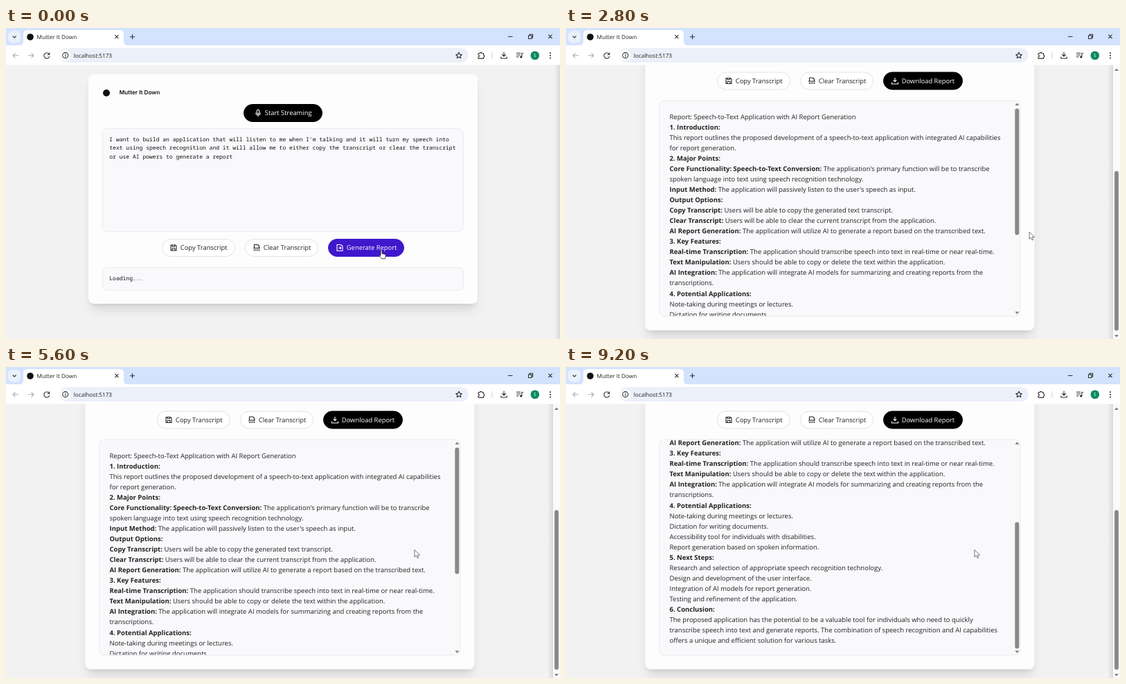
Recreate the animation shown at these times as an HTML page. Size 800 px wide and 450 px high, loop 9.3 s.

```html
<!DOCTYPE html>
<html lang="en">
<head>
<meta charset="utf-8">
<title>Mutter It Down</title>
<style>
html, body { margin: 0; width: 100%; height: 100%; overflow: hidden; }
body { position: relative; font: 9.5px/15.03px "Open Sans", sans-serif; color: #222; text-rendering: geometricPrecision; }
div, svg { position: absolute; box-sizing: border-box; white-space: nowrap; }
svg { overflow: visible; }
#stage { width: 800px; height: 450px; overflow: hidden; background: #f2f2f2; }
#doc { left: 0; top: 0; width: 800px; height: 700px; }
#card { left: 118.8px; top: 67.2px; width: 562.5px; border-radius: 8px; background: #fdfdfd;
  box-shadow: 0 12px 16px -3px rgba(0,0,0,.1), 0 5px 6px -4px rgba(0,0,0,.1); }
.panel { left: 138.8px; width: 522.7px; border: 1px solid #ebebef; border-radius: 7px; background: #f9f8fb; overflow: hidden; }
.mono { font: 8.02px/12.5px "Noto Sans Mono", monospace; color: #111; left: 149.3px; white-space: pre; }
.pill { height: 26px; border: 1px solid #e3e3e5; border-radius: 13px; background: #fff; font-size: 9.4px; line-height: 26px; }
.pill svg { left: 9.5px; top: 6px; width: 12px; height: 12px; }
.pill span { position: absolute; left: 25.8px; top: -1px; }
.dark { background: #000; border-color: #000; color: #fff; }
.violet { background: #3f18cc; border-color: #3f18cc; color: #fff; }
.line { fill: none; stroke: currentColor; stroke-width: 1.1; stroke-linejoin: round; }
.thumb { border-radius: 3px; background: #8a8a8a; }
#edge { top: 53px; width: 8px; height: 397px; background: linear-gradient(90deg, rgba(0,0,0,0), rgba(0,0,0,.1)); }
</style>
</head>
<body>
<div id="stage">
  <div id="doc">
    <div id="card"></div>
    <div style="left:139.8px;top:88.5px;width:10px;height:10px;border-radius:5px;background:#111"></div>
    <div style="left:163.8px;top:86px;font:600 8.2px/15px Inter,sans-serif;color:#111">Mutter It Down</div>
    <div class="panel" style="top:144.8px;height:150.5px"></div>
    <div class="mono" style="top:155.5px">I want to build an application that will listen to me when I'm talking and it will turn my speech into
text using speech recognition and it will allow me to either copy the transcript or clear the transcript
or use AI powers to generate a report</div>
    <div id="buttons"></div>
    <div class="panel" id="report" style="top:346.3px"><div id="lines" style="left:14.4px;top:14.7px"></div></div>
    <div class="mono" id="loading" style="top:357px">Loading...</div>
    <div id="innerBar">
      <svg fill="#808080"><path d="M653.1 353.5h6l-3-3.6zM653.1 652h6l-3 3.6z"/></svg>
      <div class="thumb" id="innerThumb" style="left:653.4px;top:357.5px;width:5.4px;height:183px"></div>
    </div>
  </div>
  <div id="edge"></div>
  <div id="pageBar" style="left:790px;top:53px;width:10px;height:397px;background:#fafafa">
    <svg fill="#808080"><path d="M2 9h6l-3-3.6zM2 391h6l-3 3.6z"/></svg>
    <div class="thumb" id="pageThumb" style="left:2.2px;top:13px;width:5.6px;height:231px"></div>
  </div>

  <svg width="800" height="54" font-size="8.2" fill="#222">
    <path fill="#d3e2fd" d="M0 0h800v26H0z"/>
    <path fill="#fff" d="M0 25h800v28.5H0zM19 25q6 0 6-6V9q0-6 6-6h133q6 0 6 6v10q0 6 6 6z"/>
    <rect x="3" y="4" width="18" height="17.5" rx="6" fill="#eaf1fe"/>
    <rect x="77" y="29" width="591" height="21" rx="10.5" fill="#ebf0f9"/>
    <circle cx="85.7" cy="39.6" r="7.6" fill="#fff"/>
    <circle cx="35" cy="13" r="4.8" fill="#111"/>
    <text x="44.5" y="16">Mutter It Down</text>
    <text x="97.8" y="42.7">localhost:5173</text>
    <circle cx="763.8" cy="39.8" r="6.3" fill="#0b8a5f"/>
    <text x="763.8" y="42.2" font-size="6.5" fill="#fff" text-anchor="middle">S</text>
    <g class="line" color="#a9abb0"><path d="M18 39.8h-8M13.5 36.3L10 39.8l3.5 3.5M32 39.8h8M36.5 36.3l3.5 3.5-3.5 3.5"/></g>
    <path stroke="#c6d4ee" d="M702 35v10"/>
    <g class="line" color="#2c2d30">
      <path d="M9.8 11.6l2.4 2.4 2.4-2.4M157.4 10.2l5 5m0-5l-5 5M179 12.7h7M182.5 9.2v7"/>
      <path d="M725 12.5h6.5M754.5 11h4.5v4.5h-4.5zM756 11V9.3h4.6V14H759M783.2 9.7l5.4 5.4m0-5.4l-5.4 5.4"/>
      <path d="M62 37.6A4 4 0 1 0 62.7 41M62.7 35.6v2.9h-2.9"/>
      <circle cx="85.7" cy="39.6" r="4"/><path d="M85.7 39v2.7M85.7 37.3v1"/>
      <path d="M654 35.3l1.3 2.8 3 .4-2.2 2 .6 3.1-2.7-1.5-2.7 1.5.6-3.1-2.2-2 3-.4z"/>
      <path d="M682 36.8h2.4a1.4 1.4 0 0 1 2.8 0h2.4v2.5a1.4 1.4 0 0 1 0 2.8v2H682v-2.3a1.4 1.4 0 0 0 0-2.8z"/>
      <path d="M719 34.8v6M716.2 38.2l2.8 2.8 2.8-2.8M714.8 41.5V44h8.4v-2.5"/>
      <path d="M737 36.3h6M737 39h6M737 41.7h3.5M744.9 42v-5.5h2"/>
    </g>
    <circle cx="743.6" cy="42" r="1.5"/>
    <g><circle cx="786" cy="36.2" r="1"/><circle cx="786" cy="39.8" r="1"/><circle cx="786" cy="43.4" r="1"/></g>
  </svg>

  <svg id="arrow"><path d="M0 0v10.4l2.4-2.2 1.7 3.8 1.7-.8L4.2 7.6h3.3z" fill="#fff" stroke="#555" stroke-width=".8"/></svg>
  <svg id="hand"><path d="M-1 1a1 1 0 0 1 2 0v4l4 .8q1.5.4 1.3 2L5.6 12.3H.3L-3 8q.3-1.6 2 0z" fill="#fff" stroke="#222" stroke-width=".8"/></svg>
</div>

<script>
const $ = id => document.getElementById(id);
const icons = {
  mic: "M6 1.2a1.6 1.6 0 0 1 1.6 1.6v2.7a1.6 1.6 0 0 1-3.2 0V2.8A1.6 1.6 0 0 1 6 1.2zM2.7 5.5a3.3 3.3 0 0 0 6.6 0M6 8.8v2.2",
  save: "M2 2h6.5L10 3.5V10H2zM4 2v2.2h3.5V2M4 10V7h4v3",
  shred: "M2.5 6V1.5h5l2 2V6M1 6.5h10M2.5 8v2.5M4.8 8v2.5M7.2 8v2.5M9.5 8v2.5",
  file: "M2 1.5h5.5L10 4v6.5H2zM4 6.3h4M6.3 4.5L8 6.3 6.3 8",
  download: "M6 1.5v5.5M3.6 4.8L6 7.2l2.4-2.4M1.5 8v2.5h9V8"
};
const pill = (id, style, left, top, width, icon, label) =>
  `<div id="${id}" class="pill ${style}" style="left:${left}px;top:${top}px;width:${width}px">` +
  `<svg viewBox="0 0 12 12" class="line"><path d="${icons[icon]}"/></svg><span>${label}</span></div>`;

$("doc").insertAdjacentHTML("beforeend", pill("start", "dark", 342.8, 109.6, 114.6, "mic", "Start Streaming"));
$("start").querySelector("svg").style.left = "14px";
$("start").querySelector("span").style.left = "30px";
$("buttons").innerHTML =
  pill("copy", "", 225, 305.2, 106, "save", "Copy Transcript") +
  pill("clear", "", 345, 305.2, 105.6, "shred", "Clear Transcript") +
  pill("generate", "violet", 465, 305.2, 110, "file", "Generate Report") +
  pill("save", "dark", 465, 305.2, 114.6, "download", "Download Report");

// Asterisks mark bold text.
$("lines").innerHTML = `Report: Speech-to-Text Application with AI Report Generation
*1. Introduction:*
This report outlines the proposed development of a speech-to-text application with integrated AI capabilities
for report generation.
*2. Major Points:*
*Core Functionality: Speech-to-Text Conversion:* The application's primary function will be to transcribe
spoken language into text using speech recognition technology.
*Input Method:* The application will passively listen to the user's speech as input.
*Output Options:*
*Copy Transcript:* Users will be able to copy the generated text transcript.
*Clear Transcript:* Users will be able to clear the current transcript from the application.
*AI Report Generation:* The application will utilize AI to generate a report based on the transcribed text.
*3. Key Features:*
*Real-time Transcription:* The application should transcribe speech into text in real-time or near real-time.
*Text Manipulation:* Users should be able to copy or delete the text within the application.
*AI Integration:* The application will integrate AI models for summarizing and creating reports from the
transcriptions.
*4. Potential Applications:*
Note-taking during meetings or lectures.
Dictation for writing documents.
Accessibility tool for individuals with disabilities.
Report generation based on spoken information.
*5. Next Steps:*
Research and selection of appropriate speech recognition technology.
Design and development of the user interface.
Integration of AI models for report generation.
Testing and refinement of the application.
*6. Conclusion:*
The proposed application has the potential to be a valuable tool for individuals who need to quickly
transcribe speech into text and generate reports. The combination of speech recognition and AI capabilities
offers a unique and efficient solution for various tasks.`.replace(/\*(.+?)\*/g, "<b>$1</b>").replace(/\n/g, "<br>");

const LOOP = 9300, READY = 500, PAGE_MAX = 241.5, INNER_MAX = 183.5;
const pageKeys = [[1850, 0], [2500, PAGE_MAX]];
const innerKeys = [[3300, 0], [4200, INNER_MAX], [4850, INNER_MAX], [5450, 0], [7100, 0], [8180, INNER_MAX]];
const cursorX = [[700, 542], [1400, 669], [2850, 669], [3250, 601], [4550, 601], [4850, 590]];
const cursorY = [[700, 321.5], [1400, 295], [2850, 295], [3250, 263], [4550, 263], [4850, 264.5]];

function valueAt(keys, t) {
  const next = keys.findIndex(key => key[0] > t);
  if (next < 0) return keys[keys.length - 1][1];
  if (next === 0) return keys[0][1];
  const [t0, a] = keys[next - 1], [t1, b] = keys[next];
  const k = (t - t0) / (t1 - t0);
  return a + (b - a) * k * k * (3 - 2 * k);
}
const move = (id, x, y) => $(id).style.transform = `translate(${x}px, ${y}px)`;
const show = (id, on) => $(id).style.display = on ? "block" : "none";

function draw(now) {
  const t = Math.floor(now % LOOP / 100) * 100;
  const ready = t >= READY;
  const page = valueAt(pageKeys, t), inner = valueAt(innerKeys, t);
  const x = valueAt(cursorX, t), y = valueAt(cursorY, t);

  for (const id of ["save", "lines", "innerBar", "pageBar"]) show(id, ready);
  for (const id of ["generate", "loading"]) show(id, !ready);
  $("card").style.height = (ready ? 612.3 : 332.3) + "px";
  $("report").style.height = (ready ? 313 : 33.3) + "px";
  $("edge").style.left = (ready ? 782 : 792) + "px";

  move("doc", ready ? -4.7 : 0, -page);
  move("buttons", ready ? -2.3 : 0, 0);
  move("lines", 0, -inner);
  move("innerThumb", 0, inner / INNER_MAX * 108);
  move("pageThumb", 0, page / PAGE_MAX * 141);

  const overButton = x < 573;
  show("hand", overButton);
  show("arrow", !overButton);
  move(overButton ? "hand" : "arrow", x, y);
  requestAnimationFrame(draw);
}
draw(performance.now());
</script>
</body>
</html>
```
